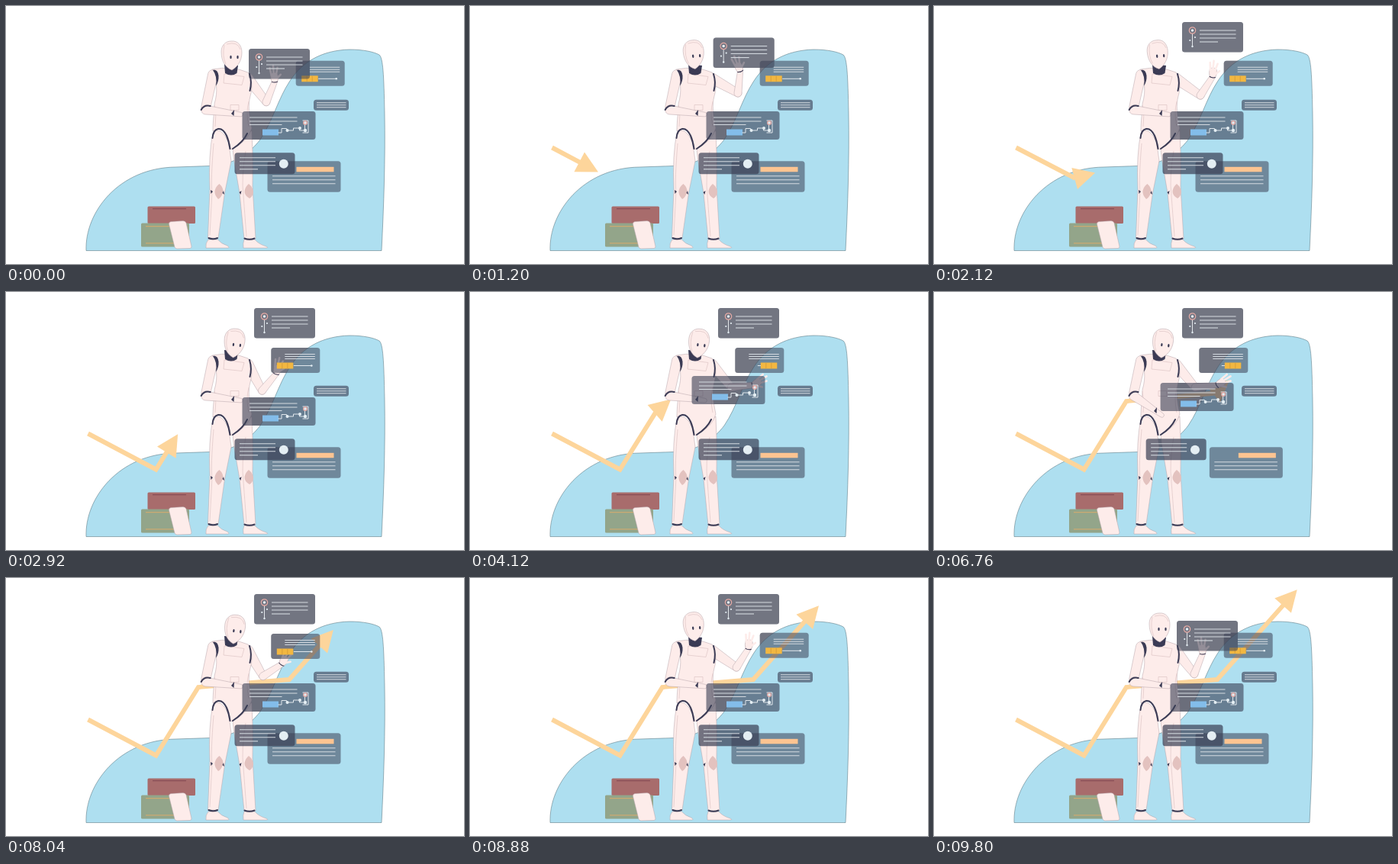
An HTML page for the animation above (9920 ms loop, 600 by 338 pixels).

```html
<!DOCTYPE html>
<html lang="en">
<head>
<meta charset="utf-8">
<style>
  html, body { margin: 0; height: 100%; overflow: hidden; background: #fff; }
  svg { display: block; width: 100vw; height: 100vh; }
  path { fill: none; }
  .skin { fill: #fdecea; stroke: #b5a2a8; stroke-width: .5; }
  .dark { fill: #3b3b55; }
  .joint { stroke: #3b3b55; stroke-width: 2; stroke-linecap: round; }
  .seam { stroke: #dfc6c6; stroke-width: .7; }
  .knee { fill: #e3c2bf; }
  .text { stroke: #d5dbe1; stroke-width: 1.1; }
  .wire { stroke: #eef2f5; stroke-width: .9; }
  .dot { fill: #e4eef3; }
  .ring { fill: none; stroke: #e5aaa5; stroke-width: 1.2; }
  .back { fill: #b6b6b8; }
  .glass { fill: #3a3f54; }
</style>
</head>
<body>
<svg viewBox="0 0 600 338">
  <g id="backs"></g>
  <path style="fill:#aedff0;stroke:#4d6872;stroke-width:.5" d="M105 320.500C103 270 148 212 222 211L267 209.500C300 208 320 192 333 175C350 150 356 122 372 98C389 72 415 58 450 57C468 57 482 60 489 64C494 68 495 90 496 140C497 200 495 260 492 320.500Z"/>

  <rect x="185.500" y="262.500" width="62.500" height="22.500" rx="1.500" fill="#a86c6c"/>
  <path d="M192 265.700H236" stroke="#7f4650"/>
  <rect x="177" y="284.500" width="63" height="31" rx="1.500" fill="#93a58a"/>
  <path d="M183 288.700H216M183 310.800H224" stroke="#d9ac6c"/>
  <path class="skin" d="M216 282.500L232 281.500Q235 281.500 236 284L243 315Q243 317.500 241 317.500L224 318Q222 318 221 316L213.500 286Q213 283 216 282.500Z"/>

  <g id="arrow">
    <path id="tip" style="fill:#fdd59b"/>
    <path id="shaft" stroke="#fdd59b" stroke-width="6"/>
  </g>

  <path id="rightUpper" class="skin"/>
  <path id="rightFore" class="skin"/>
  <g id="hand">
    <path class="skin" d="M-1 -3.500Q5 -6 10 -5Q14 0 10 4Q5 6 -1 3.500Z"/>
    <path d="M8 -4L18 -6M10 -1L21 -1.500M9 2L18 4M4 3L9 8" stroke="#fdecea" stroke-width="2.600" stroke-linecap="round"/>
    <path d="M0 -4Q-2 0 0 4" stroke="#3b3b55"/>
  </g>

  <path class="skin" d="M265 306H277.500Q281 311 290 314Q294 317 290 317H262Q261 311 265 306Z"/>
  <path class="skin" d="M312 306H326Q331 312 341 315Q345 317 340 317H311Q310 311 312 306Z"/>
  <path class="skin" d="M297 187L322 163Q324 200 323 236L327 305H312L306 245L298 198Z"/>
  <path class="skin" d="M271 166Q282 156 292 180L295 203L286.500 245L278 304H264.500L267 240Q265 195 271 166Z"/>
  <path class="seam" d="M272 180Q268 230 270 243L267 300M314 190Q308 225 311 248L315 302"/>
  <path class="joint" d="M265.500 304Q271 306.500 277 304M312.500 304.500Q319 307 325.500 304.500"/>
  <path class="knee" d="M279.500 233Q285 238 284.500 244Q282 251 278 253Q273 248 273.500 242Q275 236 279.500 233ZM318 233Q324 238 324 244Q323 250 319 252Q312 248 312.500 242Q314 236 318 233Z"/>
  <path class="dark" d="M268 241L271 243L268.500 246ZM285 242L283.500 245L286 247ZM308.500 242L305.500 244L307.500 247Z"/>

  <path class="skin" d="M270 83Q296 78 317 87C323 95 323 108 320 118C317 130 318 140 322 160Q318 176 296 188H294Q291 160 278 160L271 164C271 150 273 138 273 128C278 112 276 98 270 83Z"/>
  <path class="seam" d="M286 89L312 92.500L309 103.500L285 101ZM294 129.500H305V136.500H294ZM273 130Q276 145 274 158M318 125Q314 140 318 158"/>
  <path class="joint" d="M270.500 173C272 158 283 157 289 170Q292 177 293.500 187M297 187Q311 178 316 167M319 89Q322.500 100 319.500 111"/>

  <path id="leftUpper" class="skin"/>
  <path id="leftFore" class="skin"/>
  <path id="leftElbow" class="joint"/>
  <path id="leftWrist" class="dark"/>
  <path class="dark" d="M271 84Q277 82 278.500 91Q279 99 275 104.500Q277 92 271 84Z"/>

  <path class="dark" d="M286 76L287 88Q295 93 302.500 88L304 78Z"/>
  <g id="head">
    <path class="skin" d="M295 46C304 45 309 52 309 61C309 72 303 80 296 84C288 81 282 73 282 60C282 52 287 46 295 46Z"/>
    <path class="seam" d="M286 51Q283 66 288 76M289 50Q304 46 307 57"/>
    <ellipse class="dark" cx="294.500" cy="67" rx="1.200" ry="2.200"/>
    <ellipse class="dark" cx="303.500" cy="67" rx="1.200" ry="2.200"/>
  </g>
  <g id="panels"></g>
</svg>

<script>
const LOOP = 9920, GLIDE = 400;
const el = id => document.getElementById(id);
const setPath = (id, d) => el(id).setAttribute('d', d);
const place = (node, x, y = 0, turn = '') => node.setAttribute('transform', `translate(${x},${y})${turn}`);
const clamp = (v, lo, hi) => Math.min(hi, Math.max(lo, v));
const ease = k => k * k * (3 - 2 * k);

// Each step is a start time and a place to glide to; a step without a place goes home.
const glide = (home, steps, t) => steps.reduce((from, [start, ...to]) => {
  const k = ease(clamp((t - start) / GLIDE, 0, 1));
  return from.map((v, i) => v + ((to.length ? to : home)[i] - v) * k);
}, home);

const rule = (x1, x2, ...ys) => ys.map(y => `<path class="text" d="M${x1} ${y}H${x2}"/>`).join('');
const dot = (x, y, r, cls = 'dot') => `<circle class="${cls}" cx="${x}" cy="${y}" r="${r}"/>`;
const wire = d => `<path class="wire" d="${d}"/>`;

const panels = [
  { w: 96, h: 40.5, opacity: .54, home: [342.5, 203.3],
    steps: [[4300, 361, 195], [6200, 361, 203.3], [6740]],
    art: `<rect x="38" y="7.500" width="49" height="6.500" fill="#fdc491"/>` + rule(6.5, 89, 19.5, 24.5, 29.5) },
  { w: 79, h: 28, opacity: .7, home: [299.5, 192.3],
    steps: [[4300, 277.5, 199.3], [6200, 277.5, 192.3], [6740]],
    art: rule(6.5, 53.5, 6.5, 11.5, 16.5) + rule(6.5, 30.5, 21.5) + dot(64.3, 14.5, 6) },
  { w: 96, h: 37, opacity: .6, home: [309.5, 138], steps: [[3600, 290.5, 110], [6610]],
    art: rule(9.5, 72, 8, 13) + rule(9.5, 52, 17.5) +
      `<rect x="26.500" y="23.500" width="21" height="8" fill="#83bdea"/>` +
      wire('M47 28H51.500V22.500H58V25H67V22H75V25H82V15M79 12H86.500V28H79') +
      dot(59, 25, 2) + dot(75.5, 22, 2) + dot(82.5, 25, 2.2) + dot(82.5, 15, 2) + dot(82.5, 15, 2.4, 'ring') },
  { w: 46, h: 14, opacity: .62, home: [403, 122.7], steps: [], art: rule(4, 42.5, 4, 7, 10) },
  { w: 64, h: 33, opacity: .54, home: [379.7, 71.8], steps: [[2400, 347.3, 73], [8400]],
    art: rule(18, 57.5, 8.5, 11.5, 14.5) + wire('M29.500 23.500H53') + dot(53, 23.5, 1.3) +
      `<g id="slider"><rect y="19.500" width="21.500" height="8" fill="#f2b741"/>
       <path d="M7 20V27M14 20V27" stroke="#d29a3a" stroke-width=".8"/></g>` },
  { w: 80, h: 39.5, opacity: .54, home: [318, 56], steps: [[950, 319, 35], [1250, 325, 21], [9200]],
    art: rule(23, 70.5, 11, 16, 21) + rule(23, 47, 26) + wire('M13.500 15V32') +
      dot(13.5, 11, 4.2, 'ring') + dot(13.5, 11, 1.8) + dot(13.5, 32, 1.2) + dot(10.3, 24, 1.1) + dot(17, 20, 1.1) },
];
const sliderSteps = [[3160, 33.5], [7500]];
const leftSteps = [[4300, 279, 150], [6200, 290, 155], [6740]];
const rightSteps = [[950, 355, 79], [1900, 372, 103], [2400, 354, 107], [3160, 372, 109], [3600, 371, 122],
  [7000, 372, 109], [7500, 361, 113], [8200, 372, 103], [8700, 355, 79], [9200]];
const route = [[107.5, 185.5], [196.5, 232.5], [252, 143], [371, 133], [475, 16]];

// Tapered rounded limb with end radii r1 and r2.
function limb(x1, y1, r1, x2, y2, r2) {
  const d = Math.hypot(x2 - x1, y2 - y1), nx = (y1 - y2) / d, ny = (x2 - x1) / d;
  return `M${x1 - nx * r1} ${y1 - ny * r1}L${x2 - nx * r2} ${y2 - ny * r2}` +
    `A${r2} ${r2} 0 0 1 ${x2 + nx * r2} ${y2 + ny * r2}` +
    `L${x1 + nx * r1} ${y1 + ny * r1}A${r1} ${r1} 0 0 1 ${x1 - nx * r1} ${y1 - ny * r1}Z`;
}

// Elbow of a two-bone arm reaching from the shoulder to the wrist.
function bend([sx, sy], [wx, wy], upper, fore) {
  const d = Math.hypot(wx - sx, wy - sy), ux = (wx - sx) / d, uy = (wy - sy) / d;
  const along = (upper ** 2 - fore ** 2 + d * d) / (2 * d);
  const out = Math.sqrt(Math.max(0, upper ** 2 - along ** 2));
  return [sx + ux * along - uy * out, sy + uy * along + ux * out];
}

// Point at distance s on the route, with the corners passed so far.
function walk(s) {
  for (let i = 1; ; i++) {
    const [ax, ay] = route[i - 1], [bx, by] = route[i];
    const d = Math.hypot(bx - ax, by - ay);
    if (s <= d || i === route.length - 1)
      return { x: ax + (bx - ax) * s / d, y: ay + (by - ay) * s / d, passed: route.slice(0, i) };
    s -= d;
  }
}

function drawArrow(t) {
  el('arrow').style.display = t < 160 ? 'none' : '';
  const size = 28, half = 14.5;
  const length = Math.min(8 + t * .0503, 483);
  const base = walk(length - size), front = walk(length);
  const d = Math.hypot(front.x - base.x, front.y - base.y);
  const ux = (front.x - base.x) / d, uy = (front.y - base.y) / d;
  setPath('tip', `M${base.x + ux * size} ${base.y + uy * size}L${base.x - uy * half} ${base.y + ux * half}` +
    `L${base.x + uy * half} ${base.y - ux * half}Z`);
  setPath('shaft', length > size ? 'M' + [...base.passed, [base.x + ux, base.y + uy]].join('L') : '');
}

function drawLeftArm(t) {
  const shoulder = [271, 90], wrist = glide([297, 140], leftSteps, t);
  const [ex, ey] = bend(shoulder, wrist, 44, 36), [wx, wy] = wrist;
  setPath('leftUpper', limb(...shoulder, 6.5, ex, ey, 6));
  setPath('leftFore', limb(ex, ey + 3, 6, wx + (wx - ex) * .3, wy + (wy - ey) * .3, 2.8));
  setPath('leftElbow', `M${ex - 6} ${ey + 3}Q${ex - 2} ${ey - 4} ${ex + 6} ${ey - 2}`);
  setPath('leftWrist', `M${wx - 2} ${wy + 1}L${wx + 2} ${wy - 4}L${wx + 1.5} ${wy + 4}Z`);
}

function drawRightArm(t) {
  const shoulder = [317, 95], wrist = glide([352, 99], rightSteps, t);
  const elbow = bend(shoulder, wrist, 39, 29);
  const angle = Math.atan2(wrist[1] - elbow[1], wrist[0] - elbow[0]) * 180 / Math.PI;
  setPath('rightUpper', limb(...shoulder, 7, ...elbow, 5));
  setPath('rightFore', limb(...elbow, 5, ...wrist, 3.5));
  place(el('hand'), ...wrist, `rotate(${angle - 24})`);
  // The head follows the height of the hand.
  const nod = clamp((wrist[1] - 99) / 9, -.6, 1);
  place(el('head'), 3.5 * nod, 2.3 * nod, `rotate(${7 * nod},296,70)`);
}

for (const p of panels) {
  const box = cls => `<rect class="${cls}" width="${p.w}" height="${p.h}" rx="3.500"`;
  el('backs').insertAdjacentHTML('beforeend', `${box('back')}/>`);
  el('panels').insertAdjacentHTML('beforeend', `<g>${box('glass')} fill-opacity="${p.opacity}"/>${p.art}</g>`);
  p.nodes = [el('backs').lastElementChild, el('panels').lastElementChild];
}

function draw(t) {
  for (const p of panels) p.nodes.forEach(node => place(node, ...glide(p.home, p.steps, t)));
  place(el('slider'), ...glide([7.5], sliderSteps, t));
  drawArrow(t);
  drawLeftArm(t);
  drawRightArm(t);
}

const start = performance.now();
function tick() {
  draw((performance.now() - start) % LOOP);
  requestAnimationFrame(tick);
}
tick();
</script>
</body>
</html>
```
